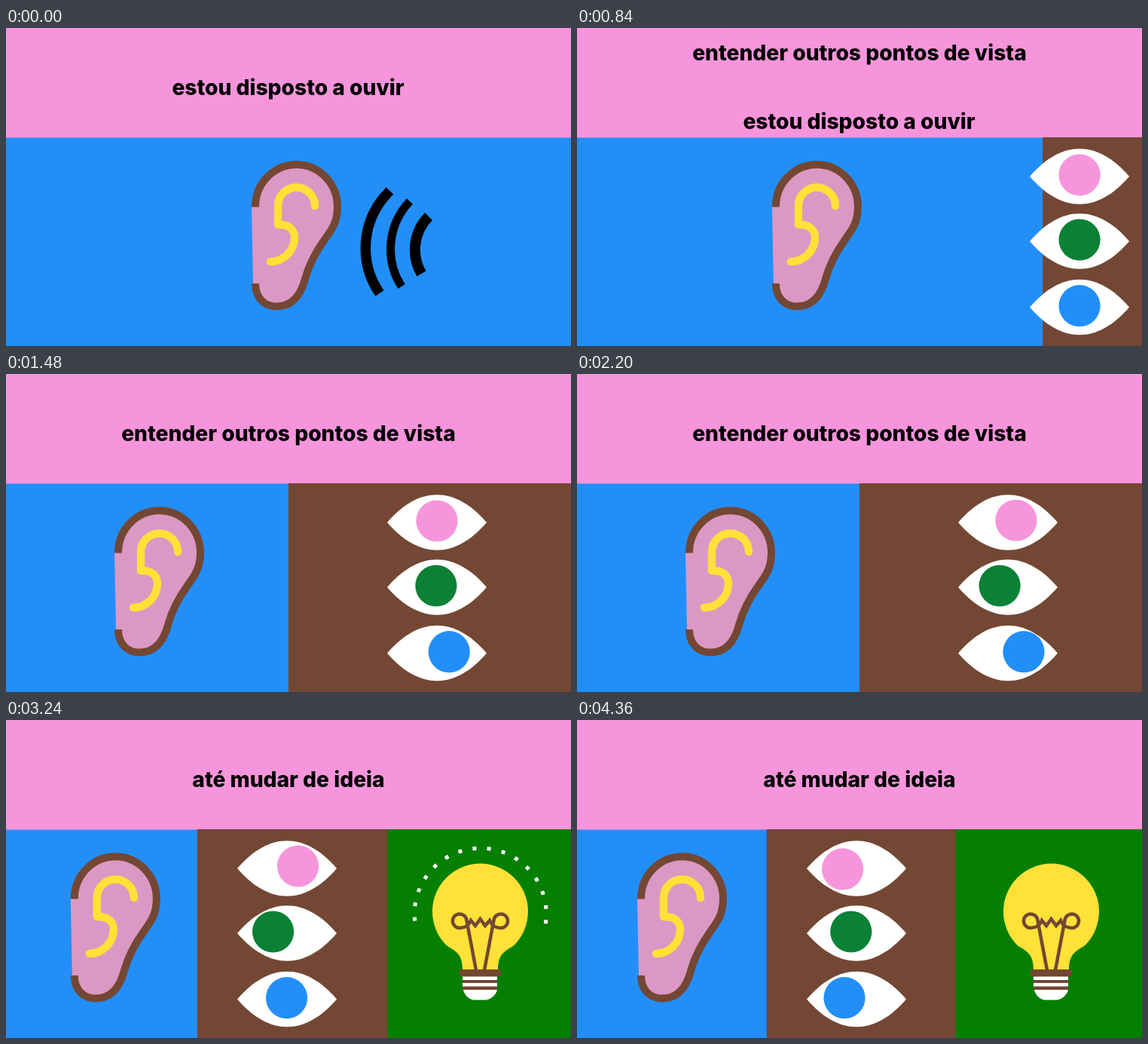
An HTML page for the animation above (4400 ms loop, 750 px wide and 422 px high).

```html
<!DOCTYPE html>
<html lang="pt">
<head>
<meta charset="utf-8">
<style>
html, body { margin: 0; width: 100%; height: 100%; overflow: hidden; background: #f695db; }
svg { display: block; width: 100vw; height: 100vh; }
text { font: 800 28.2px Inter, "Open Sans", sans-serif; text-anchor: middle; }
.line { fill: none; }
.brown { stroke: #734733; }
</style>
</head>
<body>
<svg viewBox="0 0 750 422">
  <rect width="750" height="422" fill="#f695db"/>
  <text id="hear" x="374.5">estou disposto a ouvir</text>
  <text id="views" x="375">entender outros pontos de vista</text>
  <text id="idea" x="375">até mudar de ideia</text>

  <rect y="145.5" width="750" height="277" fill="#228ff9"/>
  <rect id="brown" y="145" width="750" height="277" fill="#734733"/>
  <rect id="green" y="145" width="750" height="277" fill="#047f00"/>

  <g id="ear">
    <path fill="#db98c4" d="M0 237H5A54.5 55.5 0 0 1 114 237C114 257 107 267 97.500 280C84.500 298 76.500 313 71 333C66 352 56 369.5 33 369.5C17 369.5 5 358 5 340H2Z"/>
    <path class="line brown" stroke-width="10" d="M5 237.5A54.5 56 0 0 1 114 237C114 257 107 267 97.500 280C84.500 298 76.500 313 71 333C66 352 56 369.5 33 369.5C17 369.5 5 358 5 339"/>
    <path class="line" stroke="#ffe138" stroke-width="10.4" stroke-linecap="round" stroke-linejoin="round" d="M84 236A24.5 24.5 0 0 0 35 236V261H38C51 261 57 269 57 278C57 296 42 310 25 310"/>
  </g>
  <g class="line" stroke="#000">
    <path id="wave0" stroke-width="13.5" d="M509.5 216A106 106 0 0 0 496 352"/>
    <path id="wave1" stroke-width="11" d="M536 230A92 92 0 0 0 525 343"/>
    <path id="wave2" stroke-width="14" d="M561 250A63 63 0 0 0 551.5 326"/>
  </g>

  <g id="bulb">
    <path fill="#ffe138" d="M606 332C606 309 596 307 584.6 299A63.5 63.5 0 1 1 674.4 299C663 307 653 309 653 332Z"/>
    <path class="line brown" stroke-width="4.5" d="M624 332L611.5 266A9.3 9.3 0 1 0 602 276Q613 276 617 266L623 273L629.5 264L636 273L642 266Q646 276 657 276A9.3 9.3 0 1 0 647.5 266L635 332"/>
    <rect x="602" y="331" width="55" height="9" rx="1" fill="#734733"/>
    <rect x="606" y="340" width="46" height="19" fill="#734733"/>
    <path fill="#fff" d="M606 340.500H652V345H606ZM606 349H652V353.500H606ZM607 358H652C651 364 644 371 637 371.500H621C614 371 608 364 607 358Z"/>
  </g>
  <g class="line" stroke="#fff" stroke-width="5">
    <path id="ring0" stroke-dasharray="5 14.4" d="M542.700 266.500A87.500 87.500 0 1 1 715.700 274"/>
    <path id="ring1" stroke-dasharray="5 18" d="M526.800 267A103.300 103.300 0 1 1 731.500 277"/>
  </g>
  <g id="eyes"></g>
</svg>
<script>
const LOOP = 4400, STEP = 40;
const $ = id => document.getElementById(id);

const ease = {
  smooth: u => u * u * (3 - 2 * u),
  out: u => 1 - (1 - u) ** 4,
  linear: u => u
};

// Each move: [start, duration, target, easing = smooth]
function track(value, ...moves) {
  return t => {
    let v = value;
    for (const [start, span, to, kind = 'smooth'] of moves) {
      const u = Math.min(1, Math.max(0, (t - start) / span));
      v += (to - v) * ease[kind](u);
    }
    return v;
  };
}

const textY = {
  hear: track(88.5, [556, 570, 179.5]),
  views: track(-2.5, [556, 570, 88.5], [2522, 550, 179.5]),
  idea: track(-5.5, [2522, 486, 88.5])
};
const panelX = {
  brown: track(750, [573, 668, 375], [2768, 511, 251.7]),
  green: track(750, [2780, 497, 502.7])
};
const earX = track(326, [561, 678, 144], [2657, 716, 80]);
const eyesX = track(871, [640, 803, 572, 'out'], [2687, 588, 371]);
const bulbY = track(250, [2600, 450, 0]);

const irises = [
  { color: '#f695db', eye: 197,
    x: track(0, [1480, 960, 14.5, 'linear'], [3280, 1100, -19, 'linear']),
    y: track(195, [1480, 960, 194, 'linear'], [3280, 1100, 198, 'linear']) },
  { color: '#0a8135', eye: 283,
    x: track(0, [1400, 1360, -18.5, 'linear'], [3400, 980, -7, 'linear']),
    y: () => 281 },
  { color: '#228ff9', eye: 370.5,
    x: track(0, [940, 700, 21, 'linear'], [2623, 1062, -16, 'linear']),
    y: () => 368.7 }
];

// Visible spans
const shown = {
  views: [560, 3120], idea: [2520, LOOP],
  wave0: [0, 600], wave1: [0, 360], wave2: [0, 120],
  ring0: [3200, 3920], ring1: [3440, 4160]
};

function add(parent, tag, attrs) {
  const el = document.createElementNS('http://www.w3.org/2000/svg', tag);
  for (const k in attrs) el.setAttribute(k, attrs[k]);
  return parent.appendChild(el);
}

for (const iris of irises) {
  add($('eyes'), 'path', {
    fill: '#fff',
    d: `M-66 ${iris.eye}c42 -49 90 -49 132 0c-42 49 -90 49 -132 0Z`
  });
  iris.el = add($('eyes'), 'circle', { r: 27.6, fill: iris.color });
}

const move = (id, x, y) => $(id).setAttribute('transform', `translate(${x} ${y})`);

function draw(t) {
  for (const id in textY) $(id).setAttribute('y', textY[id](t));
  for (const id in panelX) $(id).setAttribute('x', panelX[id](t));
  move('ear', earX(t), 0);
  move('eyes', eyesX(t), 0);
  move('bulb', 0, bulbY(t));
  for (const { el, x, y } of irises) {
    el.setAttribute('cx', x(t));
    el.setAttribute('cy', y(t));
  }
  for (const id in shown) {
    const [on, off] = shown[id];
    $(id).style.display = t >= on && t < off ? '' : 'none';
  }
}

let origin;
function tick(now) {
  origin ??= now;
  draw(Math.floor(((now - origin) % LOOP) / STEP) * STEP);
  requestAnimationFrame(tick);
}
draw(0);
requestAnimationFrame(tick);
</script>
</body>
</html>
```
